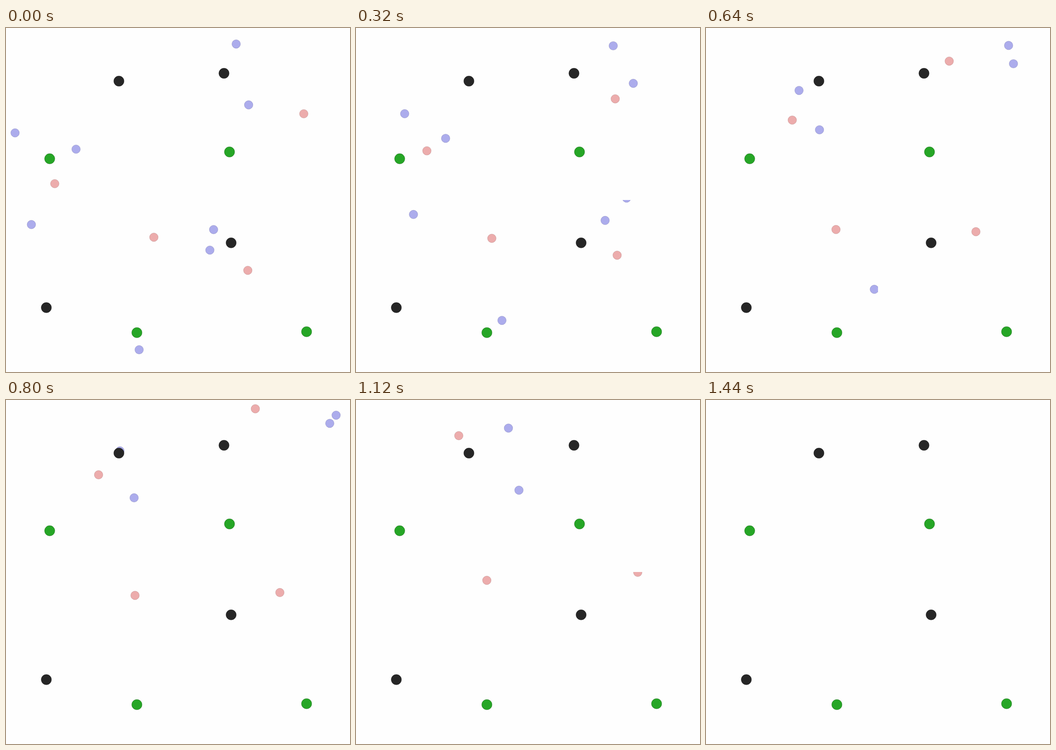
An HTML page with a canvas that plays this animation: 748 by 748 pixels, repeating every 3.24 s.

```html
<!DOCTYPE html>
<html lang="en">
<head>
<meta charset="utf-8">
<title>Agents in four panels</title>
<style>
  html, body { margin: 0; width: 100%; height: 100%; overflow: hidden; background: #fefefe; }
  canvas { display: block; width: 748px; height: 748px; }
</style>
</head>
<body>
<canvas id="stage" width="748" height="748"></canvas>
<script>
const ctx = document.getElementById('stage').getContext('2d');
const LOOP = 3240, STEP = 40, RUN = 1440, HALF = 374;
const DAMPING = 0.75;

const style = {
  red:   { rgb: [217, 89, 89], alpha: 0.5, r: 9.35 },
  blue:  { rgb: [89, 89, 217], alpha: 0.5, r: 9.35 },
  black: { rgb: [38, 38, 38],  alpha: 1,   r: 11.2 },
  green: { rgb: [38, 166, 38], alpha: 1,   r: 11.2 }
};

// Speeds are in pixels per 100 ms. An agent cruises on a parabola (bend)
// while the kick it starts with dies away by the damping of each step.
const still = [0, 0];
const agent = (kind, start, cruise, kick = still, bend = still) =>
  ({ kind, start, cruise, kick, bend });

const panels = [
  { corner: [0, 0], black: [245.5, 115.5], green: [95, 284.3], agents: [
    agent('red', [106, 338.5], [13.45, -13.9], [9.5, -22.5], [-0.34, -0.66]),
    agent('blue', [19.7, 228], [35.5, -16.9], [-25, 13], [-0.485, 0.075]),
    agent('blue', [152.3, 263.5], [8.3, -6.2], [8.7, -4.7], [0.8, 0.054])
  ] },
  { corner: [HALF, 0], black: [474, 98.5], green: [486, 269.5], agents: [
    agent('red', [647.5, 186.5], [-52.8, -12.6], [46.5, 25], [4.23, -1.43]),
    agent('blue', [500.5, 34.8], [18.9, 6.2], [-16.5, -10.4], [1.29, -0.64]),
    agent('blue', [527.6, 167.2], [15.3, -4.3], [24, -27], [0.47, -0.86])
  ] },
  { corner: [0, HALF], black: [87.7, 608], green: [284.6, 662.4], agents: [
    agent('red', [321.5, 455], [-8.95, -2.6], [-3.3, 16.4], [0.53, -0.4]),
    agent('blue', [55.2, 427.4], [30.8, -14], [-32, 25.4]),
    agent('blue', [289.5, 699.6], [8.3, -22.6], [-7, 8], [0.74, 0.13])
  ] },
  { corner: [HALF, HALF], black: [489.5, 467.1], green: [653.6, 660.4], agents: [
    agent('red', [525.8, 527], [4.95, -19.9], [28.9, 30.5], [0.02, 0.32]),
    agent('blue', [451.4, 438.3], [42.8, -21.4]),
    agent('blue', [443.3, 483], [34.2, -22], [-12.3, 6.5])
  ] }
];

function position({ start, cruise, kick, bend }, ms) {
  const t = ms / 100, spent = 1 - DAMPING ** (ms / STEP);
  return start.map((s, i) => s + cruise[i] * t + bend[i] * t * t + kick[i] * spent);
}

function dot(kind, [x, y]) {
  const { rgb, alpha, r } = style[kind];
  ctx.beginPath();
  ctx.arc(x, y, r, 0, 2 * Math.PI);
  ctx.fillStyle = `rgba(${rgb}, ${alpha})`;
  ctx.fill();
  ctx.strokeStyle = `rgba(${rgb.map(c => Math.round(c / 2))}, ${alpha / 2})`;
  ctx.lineWidth = 0.9;
  ctx.stroke();
}

function drawPanel({ corner, black, green, agents }, ms) {
  ctx.save();
  ctx.beginPath();
  ctx.rect(...corner, HALF, HALF);
  ctx.clip();
  if (ms < RUN) agents.forEach(a => dot(a.kind, position(a, ms)));
  dot('black', black);
  dot('green', green);
  ctx.restore();
}

function frame() {
  const ms = Math.floor(performance.now() % LOOP / STEP) * STEP;
  ctx.fillStyle = '#fefefe';
  ctx.fillRect(0, 0, 748, 748);
  panels.forEach(p => drawPanel(p, ms));
  requestAnimationFrame(frame);
}
frame();
</script>
</body>
</html>
```
